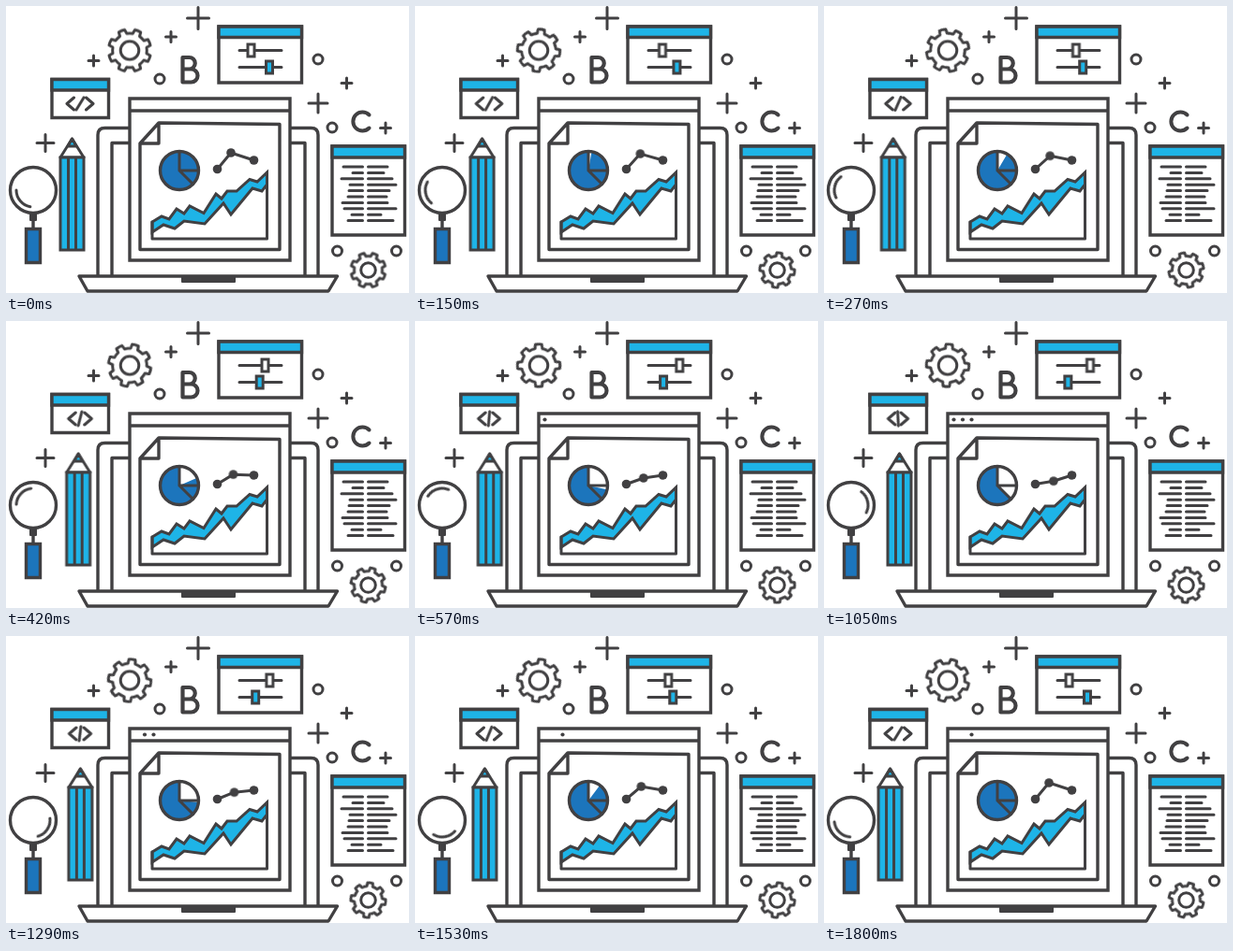
An HTML page for the animation above (1830 ms loop, 430 by 307 pixels).

```html
<!DOCTYPE html>
<html lang="en">
<head>
<meta charset="utf-8">
<title>Laptop and tools</title>
<style>
html, body { margin: 0; width: 100%; height: 100%; overflow: hidden; background: #fff; }
svg { display: block; width: 430px; height: 307px; }

.art { fill: none; stroke: #414042; stroke-width: 3.4; stroke-linejoin: round; stroke-linecap: round; }
.thin { stroke-width: 3; }
.sharp { stroke-linejoin: miter; }
.white { fill: #fff; }
.sky { fill: #1eb4e7; }
.blue { fill: #1c75bc; }
.ink { fill: #414042; }

.spin, .sway, .glide, .slash, .wedge, .trend, .dot {
  animation-duration: 1830ms;
  animation-iteration-count: infinite;
  animation-timing-function: cubic-bezier(.37, 0, .63, 1);
}
.spin { animation-name: spin; animation-timing-function: linear; }
.sway { animation-name: sway; }
.glide { animation-name: glide; }
.slash { animation-name: slash; }
.wedge { animation-name: wedge; }
.trend { animation-name: trend; }
.dot { animation-timing-function: step-end; stroke: none; }

@keyframes spin { to { transform: rotate(360deg); } }
@keyframes sway {
  0%, 100% { transform: translate(0, 0); }
  46.5%, 53.5% { transform: translate(var(--x, 0), var(--y, 0)); }
}
@keyframes glide {
  0%, 100% { transform: translate(0, 0); }
  38%, 62% { transform: translate(var(--x), 0); }
}
@keyframes slash {
  0%, 100% { transform: rotate(0deg); }
  46.5%, 53.5% { transform: rotate(-35deg); }
}
@keyframes wedge {
  0%, 100% { stroke-dasharray: 0 360; }
  46.5%, 53.5% { stroke-dasharray: 135 225; }
}
@keyframes trend {
  0%, 100% { d: path("M225.5 174.5L240 157L264.5 165"); }
  46.5%, 53.5% { d: path("M225.5 174.5L245 171.5L264.5 165"); }
}
@keyframes dot1 { 0%, 64% { opacity: 0; } 24.6% { opacity: 1; } }
@keyframes dot2 { 0%, 77% { opacity: 0; } 37.7% { opacity: 1; } }
@keyframes dot3 { 0% { opacity: 0; } 50.8%, 100% { opacity: 1; } }
</style>
</head>
<body>
<svg viewBox="0 0 430 307">
<g class="art">
  <!-- laptop -->
  <path class="white" d="M98 289V138Q98 130.500 105.500 130.500H325.500Q333 130.500 333 138V289"/>
  <path d="M113 289V146.500H319V289"/>
  <path class="white" d="M78 289H353.500L344 305H87Z"/>
  <path class="ink" stroke-width="2" d="M188 290H244V295H188Z"/>

  <!-- browser -->
  <path class="white sharp" d="M132 99H303V272H132ZM132 112H303"/>
  <g class="ink">
    <circle class="dot" style="animation-name:dot1" cx="138.500" cy="105.500" r="2.100"/>
    <circle class="dot" style="animation-name:dot2" cx="148" cy="105.500" r="2.100"/>
    <circle class="dot" style="animation-name:dot3" cx="157.500" cy="105.500" r="2.100"/>
  </g>
  <path class="white" d="M163 125L292 126.500V260.500H143V147ZM163 125V147H143"/>

  <!-- area chart -->
  <path class="sky thin sharp" d="M156 231L166 225L174 228L182 217L190 222L196 214L211 221.500L224 201L230 206L236 198H246L260 185.500L268 188L278.500 178V191L273 198L263 195L240 223L232 211L212 233L190 230L180 238L168 234L156 242Z"/>
  <path class="thin" d="M156 231V249H278.500V178"/>

  <!-- pie -->
  <g transform="translate(185 176)">
    <circle class="blue" r="20.500" stroke="none"/>
    <circle class="wedge" r="10" stroke="#fff" stroke-width="20" stroke-linecap="butt" pathLength="360" transform="rotate(-90)"/>
    <path class="thin" d="M0 -20V0H20M0 0L14.500 14.500"/>
    <circle r="20.500"/>
  </g>

  <!-- trend line -->
  <path class="trend thin" d="M225.500 174.500L240 157L264.500 165"/>
  <g class="ink" stroke="none">
    <circle cx="225.500" cy="174.500" r="4.800"/>
    <circle cx="264.500" cy="165" r="4.800"/>
    <circle class="sway" style="--x:5px;--y:14.500px" cx="240" cy="157" r="4.800"/>
  </g>

  <!-- slider window -->
  <path class="white sharp" d="M227 22H315.500V82H227Z"/>
  <path class="sky sharp" d="M227 22H315.500V33.500H227Z"/>
  <path class="thin" d="M249 47.500H294M249 65.500H294"/>
  <rect class="white thin sharp glide" style="--x:22.500px" x="258" y="41" width="7" height="13"/>
  <rect class="sky thin sharp sway" style="--x:-21px" x="277.500" y="59" width="7" height="13"/>

  <!-- code window -->
  <path class="white sharp" d="M49 78.500H109.500V119.500H49Z"/>
  <path class="sky sharp" d="M49 78.500H109.500V90H49Z"/>
  <g class="thin">
    <path class="sway" style="--x:3.500px" d="M72.500 98L65 104.500L72.500 111"/>
    <path class="sway" style="--x:-3.500px" d="M85.500 98L93 104.500L85.500 111"/>
    <g transform="translate(79 104.500)"><path class="slash" d="M-4 6.500L4 -6.500"/></g>
  </g>

  <!-- list window -->
  <path class="white sharp" d="M348 150H425.500V245H348Z"/>
  <path class="sky sharp" d="M348 150H425.500V162H348Z"/>
  <path class="thin" id="list"/>

  <!-- pencil -->
  <g class="glide thin" style="--x:10px">
    <path class="white" d="M58 162L70.500 142L83 162Z"/>
    <path class="sky" d="M66 150L70.500 142L75 150Z"/>
    <path class="sky sharp" d="M58 162H83V261H58ZM66.500 162V261M74.500 162V261"/>
  </g>

  <!-- magnifier -->
  <path d="M29 222V238"/>
  <path class="ink" stroke-width="2" d="M26 222.500H32V229H26Z"/>
  <path class="blue sharp" d="M21.500 238.500H36.500V274.500H21.500Z"/>
  <circle class="white" cx="29" cy="197" r="24.500"/>
  <g transform="translate(29 197)"><path class="spin thin" d="M-18 0A18 18 0 0 0 -3.100 17.700"/></g>

  <!-- gears -->
  <g class="thin" transform="translate(132 47.500)"><path class="spin" id="bigGear"/><circle r="9.800"/></g>
  <g class="thin" transform="translate(386.500 282.500)"><path class="spin" id="smallGear"/><circle r="7.800"/></g>

  <!-- letters and ornaments -->
  <path stroke-width="4.200" d="M188.500 55V81.500H197.500A7 7 0 0 0 197.500 67.500H188.500H195.500A6.250 6.250 0 0 0 195.500 55H188.500"/>
  <path stroke-width="4" d="M387.500 116.500A10 10 0 1 0 387.500 130.500"/>
  <path class="thin" id="pluses"/>
  <g class="thin">
    <circle cx="164" cy="78" r="5"/>
    <circle cx="333" cy="57" r="5"/>
    <circle cx="348" cy="130" r="5"/>
    <circle cx="353.500" cy="262" r="5"/>
    <circle cx="416.500" cy="262" r="5"/>
  </g>
</g>
</svg>
<script>
const draw = (id, d) => document.getElementById(id).setAttribute("d", d);

function gear(outer, root, teeth = 8) {
  const step = 360 / teeth;
  const at = (r, deg) => {
    const a = deg * Math.PI / 180;
    return `${(r * Math.cos(a)).toFixed(2)} ${(r * Math.sin(a)).toFixed(2)}`;
  };
  let d = "";
  for (let i = 0; i < teeth; i++) {
    const a = (i + 0.5) * step;
    d += i ? `A${root} ${root} 0 0 1 ` : "M";
    d += `${at(root, a - 12.5)}L${at(outer, a - 8.5)}`;
    d += `A${outer} ${outer} 0 0 1 ${at(outer, a + 8.5)}L${at(root, a + 12.5)}`;
  }
  return d + `A${root} ${root} 0 0 1 ${at(root, step / 2 - 12.5)}Z`;
}
draw("bigGear", gear(22.7, 18.3));
draw("smallGear", gear(18.6, 15));

// left edge of the first column, right edge of the second
const rows = [[360, 407], [370, 403], [358, 412], [367, 416], [366, 409],
              [365, 406], [359, 407], [361, 416], [369, 400], [365, 413]];
draw("list", rows.map(([l, r], i) => {
  const y = 172 + i * 6.4;
  return `M${l} ${y}H380.5M386.500 ${y}H${r}`;
}).join(""));

// centre and half length
const pluses = [[205, 13, 11.5], [176, 33, 5.5], [93.5, 58.5, 5.5], [363.5, 82.5, 5.5],
                [333, 104, 10], [405, 130.5, 5.5], [42, 146.5, 9]];
draw("pluses", pluses.map(([x, y, s]) =>
  `M${x - s} ${y}h${2 * s}M${x} ${y - s}v${2 * s}`).join(""));
</script>
</body>
</html>
```
